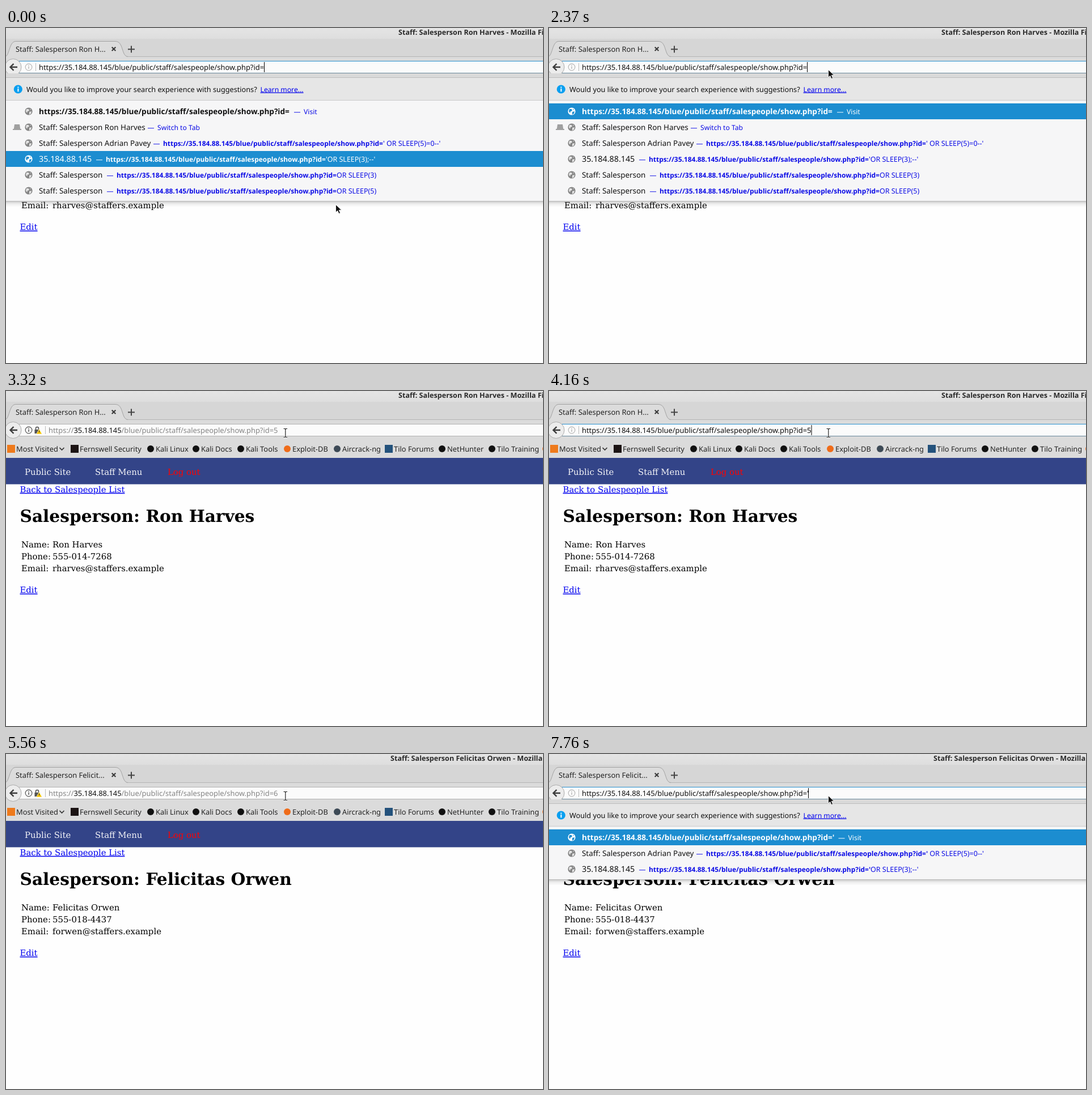
Recreate the animation shown at these times as an HTML page. Size 947 by 591 pixels, loop 8 s.

```html
<!DOCTYPE html>
<html lang="en">
<head>
<meta charset="utf-8">
<title>Staff browser</title>
<style>
  html, body { margin: 0; width: 100%; height: 100%; overflow: hidden; background: #fefefe; }
  svg { display: block; width: 100%; height: 100%; }
  text { font-family: "Noto Sans", "Open Sans", sans-serif; text-rendering: geometricPrecision; white-space: pre; }
  .serif { font-family: "DejaVu Serif", serif; }
  .b { font-weight: 700; }
  .link { fill: #00e; text-decoration: underline; }
</style>
</head>
<body>
<svg id="stage" viewBox="0 0 947 591">
  <defs>
    <linearGradient id="bar" x2="0" y2="1">
      <stop offset="0" stop-color="#e4e4e4"/><stop offset="1" stop-color="#dedede"/>
    </linearGradient>
    <linearGradient id="shade" x2="0" y2="1">
      <stop offset="0" stop-opacity=".2"/><stop offset=".4" stop-opacity=".07"/><stop offset="1" stop-opacity="0"/>
    </linearGradient>
  </defs>
  <g id="chrome"></g>
  <g id="page"></g>
  <g id="field"></g>
  <g id="popup"></g>
  <g id="pointer"></g>
</svg>
<script>
const LOOP = 8000;
const HOST = '35.184.88.145';
const PATH = '/blue/public/staff/salespeople/show.php?id=';
const URL_TEXT = 'https://' + HOST + PATH;
const BLUE = '#1c8dd0', LINK = '#0c0ce6';

const people = [
  { name: 'Ron Harves', short: 'Ron H...', phone: '555-014-7268', mail: 'rharves@staffers.example', titleX: 692 },
  { name: 'Felicitas Orwen', short: 'Felicit...', phone: '555-018-4437', mail: 'forwen@staffers.example', titleX: 678 }
];

const $ = id => document.getElementById(id);
const text = (x, y, size, str, attrs = '') =>
  `<text x="${x}" y="${y}" font-size="${size}" ${attrs}>${str}</text>`;
const rect = (x, y, w, h, fill) =>
  `<rect x="${x}" y="${y}" width="${w}" height="${h}" fill="${fill}"/>`;
const dot = (x, y, r, fill, more = '') =>
  `<circle cx="${x}" cy="${y}" r="${r}" fill="${fill}" ${more}/>`;
const path = (d, attrs) => `<path d="${d}" ${attrs}/>`;
const serif = (x, y, str, attrs = '') => text(x, y, 14.87, str, `class="serif" ${attrs}`);

// Suggestion rows
const visit = q => ({ name: URL_TEXT + q, bold: true, dash: 508 + (q === "'" ? 2.5 : q ? 8 : 0), note: 'Visit' });
const hit = (name, dash, rest, q = '') => ({ name, dash, rest, q });
const openTab = (name, dash) => ({ name, dash, note: 'Switch to Tab', tab: true });
const staff = name => 'Staff: Salesperson' + (name ? ' ' + name : '');

const quoted = q => [
  hit(staff('Adrian Pavey'), 260, (q ? '' : "'") + ' OR SLEEP(5)=0--\'', q),
  hit(HOST, 159, (q ? '' : "'") + "OR SLEEP(3);--'", q)
];
const common = [...quoted(''), hit(staff(), 178, 'OR SLEEP(3)'), hit(staff(), 178, 'OR SLEEP(5)')];
const ronTab = openTab(staff(people[0].name), 250);
const first = [visit(''), ronTab, ...common];
const second = [visit(''), hit(staff(people[0].name), 250, '5'), openTab(staff(people[1].name), 278), ...common];
const narrowed = [visit("'"), ...quoted("'")];

// Each step changes only the listed parts of the state
const steps = [
  [0, { page: 0, title: 0, tab: 0, mode: 'edit', q: '', caret: true, rows: first, slots: 6, sel: 3, mouse: [581, 311] }],
  [150, { sel: 5, mouse: [597, 363] }],
  [900, { caret: false }],
  [1980, { caret: true, sel: 4, mouse: [566, 262] }],
  [2100, { sel: 1, mouse: [522, 168] }],
  [2220, { sel: 0, mouse: [496, 83] }],
  [2370, { mouse: [492, 73] }],
  [2520, { rows: null, mouse: null }],
  [2800, { q: '5', rows: [visit('5')], mouse: [492, 73] }],
  [2920, { rows: [visit('5'), ronTab], slots: 2 }],
  [3050, { rows: null, mode: 'load', mouse: null }],
  [3320, { mode: 'idle' }],
  [4160, { mode: 'edit' }],
  [4900, { q: '', rows: [visit('')], mouse: [492, 73] }],
  [5020, { rows: first, slots: 6 }],
  [5150, { q: '6', rows: [visit('6'), ...first.slice(1)] }],
  [5270, { rows: null, mode: 'load', mouse: null }],
  [5410, { mode: 'idle', page: 1, tab: 1 }],
  [5560, { title: 1 }],
  [6210, { mode: 'edit' }],
  [6770, { mouse: [492, 73] }],
  [6920, { q: '', rows: second, slots: 7 }],
  [7450, { q: "'", rows: [...narrowed, ...second.slice(3)] }],
  [7760, { rows: narrowed, slots: 3 }]
];
let last = {};
const states = steps.map(([at, change]) => (last = { ...last, ...change, at }));

const bookmarks = [
  [18, 'Most Visited', '#ee7a1c', 1], [130, 'Fernswell Security', '#1c1414', 1], [264, 'Kali Linux', '#111'],
  [344, 'Kali Docs', '#111'], [423, 'Kali Tools', '#111'], [505, 'Exploit-DB', '#ef6c1a'],
  [593, 'Aircrack-ng', '#3d4a56'], [684, 'Tilo Forums', '#24527c', 1], [778, 'NetHunter', '#111'],
  [866, 'Tilo Training', '#111'], [961, '', '#ef6c1a']
];

function drawChrome(s) {
  const loading = s.mode === 'load';
  const label = loading
    ? dot(25, 37, 5.5, 'none', 'stroke="#888" stroke-width="2" stroke-dasharray="2 1.5"') + text(39, 42, 12.9, 'Connecting...', 'fill="#222"')
    : text(17, 42, 12.9, staff(people[s.tab].short), 'fill="#222"');
  const person = people[s.title];
  return rect(0, 0, 947, 19, 'url(#bar)') + rect(0, 19, 947, 31, '#d6d6d6') + rect(0, 50, 947, 68, '#dbdbdb') +
    rect(0, 50, 947, 1, '#b4b4b4') +
    path('M-2 51C6.5 50 5 24 17 24H193C208 24 203 50 215 51Z', 'fill="#dcdcdc"') +
    path('M-2 50.5C6.5 50 5 24 17 23.5H193C208 24 203 50 215 50.5', 'fill="none" stroke="#a2a2a2"') +
    text(person.titleX, 11.7, 12.6, staff(person.name) + ' - Mozilla Firefox', 'class="b" fill="#2a2a2a"') +
    label +
    path('M186.7 33.7l6.6 6.6m0-6.6l-6.6 6.6', 'stroke="#3c3c3c" stroke-width="2.1"') +
    path('M215 37.5h12m-6-6v12', 'stroke="#444" stroke-width="2"') +
    bookmarks.map(([x, name, fill, square]) =>
      (square ? rect(x - 16, 95, 14, 14, fill) : dot(x - 9, 102, 6, fill)) +
      text(x, 107, 12.85, name, 'fill="#222"')).join('') +
    path('M94.5 100l4 4 4-4', 'fill="none" stroke="#333" stroke-width="1.7"');
}

function drawPage(s) {
  const p = people[s.page];
  const lines = [['Name:', p.name], ['Phone:', p.phone], ['Email:', p.mail]];
  return rect(0, 118, 947, 473, '#fefefe') + rect(0, 118, 947, 46.5, '#334488') +
    serif(33, 148, 'Public Site', 'fill="#f4f4f8"') + serif(157, 148, 'Staff Menu', 'fill="#f4f4f8"') +
    serif(285, 148, 'Log out', 'fill="#f00"') +
    serif(24.5, 178.8, '<tspan class="link">Back to Salespeople List</tspan>') +
    text(24.5, 231, 29.65, 'Salesperson: ' + p.name, 'class="serif b"') +
    lines.map(([key, value], i) =>
      serif(27, 275.5 + i * 21.4, key) + serif(82, 275.5 + i * 21.4, value)).join('') +
    serif(24.5, 356.3, '<tspan class="link">Edit</tspan>');
}

function drawField(s) {
  const edit = s.mode === 'edit', idle = s.mode === 'idle';
  const ink = idle ? '#555' : '#b8b8b8';
  const x = idle ? 75 : 58;
  const grey = '<tspan fill="#858585">';
  const address = edit ? URL_TEXT + s.q : `${grey}https://</tspan>${HOST}${grey}${PATH}${s.q}</tspan>`;
  const caretX = 455 + (s.q === "'" ? 2 : s.q ? 7.5 : 0);
  const lock = rect(50.5, 68, 9, 7, '#555') +
    path('M52.5 68v-2a2.5 2.5 0 0 1 5 0v2', 'fill="none" stroke="#555" stroke-width="1.6"') +
    path('M58.5 67l5 9h-10z', 'fill="#f5c400" stroke="#fff" stroke-width=".6"') + rect(58, 70, 1, 3, '#333');
  return rect(20, 59, 927, 20, '#fbfbfb') +
    rect(20, 58, 927, 1, edit ? '#2a90cf' : '#b2b2b2') + rect(20, 79, 927, 1, edit ? '#68889c' : '#b2b2b2') +
    dot(12.5, 69, 14.5, '#ececec', 'stroke="#aaa"') +
    path('M20 69H8m5.5-5.8L7.5 69l6 5.8', 'fill="none" stroke="#3b3b3b" stroke-width="2.3"') +
    dot(40, 69, 5.8, 'none', `stroke="${ink}" stroke-width="1.2"`) +
    rect(39.3, 67.8, 1.5, 4.2, ink) + rect(39.3, 65.3, 1.5, 1.5, ink) +
    (idle ? lock : '') + rect(idle ? 69 : 52, 62, 1, 14, '#bbb') +
    text(x, 73.5, 12.9, address, 'fill="#111"') +
    (edit && s.caret ? rect(caretX, 60, 1, 18, '#000') : '');
}

function drawRow(row, i, selected) {
  const y = 147 + i * 28;
  const main = selected ? '#fff' : '#111', sub = selected ? '#fff' : LINK;
  const globe = selected ? '#fff' : '#858585', land = selected ? BLUE : '#e4e4e4';
  const detail = row.note ||
    `<tspan class="b" font-size="11.92">${URL_TEXT}${row.q}</tspan><tspan font-size="12.5">${row.rest}</tspan>`;
  const size = row.bold ? 13.57 : row.name === HOST ? 14.3 : 13.4;
  return (selected ? rect(0, y - 14, 947, 28, BLUE) : '') +
    (row.tab ? path(`M15 ${y - 5}h9l1.2 8h1.8v2h-15v-2h1.8z`, 'fill="#a0a0a0"') : '') +
    dot(40, y, 6.6, globe) +
    path(`M36 ${y - 4}l4 0 1 3-3 1-1 3-2-3zM41 ${y + 1}l4-1-1 4-3 2zM42 ${y - 5}l2 2-1 1z`, `fill="${land}"`) +
    text(58, y + 4.6, size, row.name, `fill="${main}" ${row.bold ? 'class="b"' : ''}`) +
    text(row.dash - .5, y + 5.2, 12, '—', `fill="${sub}"`) +
    text(row.dash + 17, y + 5.4, 12.1, detail, `fill="${sub}"`);
}

function drawPopup(s) {
  if (!s.rows) return '';
  const end = 138 + s.slots * 28;
  return rect(0, 80, 947, 8, '#d9d9d9') + rect(0, 87, 947, 1, '#bdbdbd') +
    rect(0, 88, 947, end - 88, '#f6f6f7') + rect(0, 88, 947, 39, '#e6e6e6') + rect(0, 127, 947, 1, '#c9c9c9') +
    rect(0, end - 1, 947, 1, '#bcbcbc') + rect(0, end, 947, 10, 'url(#shade)') +
    dot(21.3, 108, 7.6, '#0a9ff0') + rect(20.4, 106.8, 2, 5.5, '#fff') + rect(20.4, 103.6, 2, 2, '#fff') +
    text(36, 112.6, 12.69, 'Would you like to improve your search experience with suggestions?', 'fill="#111"') +
    text(448.5, 112.6, 12.2, 'Learn more...', 'class="link"') +
    s.rows.map((row, i) => drawRow(row, i, i === s.sel)).join('');
}

function drawPointer({ mouse }) {
  if (!mouse) {
    const beam = 'M489.5 66.5h2.3l1 1 1-1h2.3M492.8 67.5v13M489.5 81.5h2.3l1-1 1 1h2.3';
    return path(beam, 'fill="none" stroke="#fff" stroke-width="2.6"') + path(beam, 'fill="none" stroke="#222" stroke-width="1.2"');
  }
  return path('M.5 .5V14.3L3.7 11.3L6 16.5L8.6 15.4L6.3 10.3H10.8Z',
    `transform="translate(${mouse})" fill="#111" stroke="#fff" stroke-width=".9"`);
}

let shown;
function frame(now) {
  const t = now % LOOP;
  const s = states.filter(state => state.at <= t).pop();
  if (s !== shown) {
    shown = s;
    $('chrome').innerHTML = drawChrome(s);
    $('page').innerHTML = drawPage(s);
    $('field').innerHTML = drawField(s);
    $('popup').innerHTML = drawPopup(s);
    $('pointer').innerHTML = drawPointer(s);
  }
  requestAnimationFrame(frame);
}
frame(performance.now());
</script>
</body>
</html>
```
